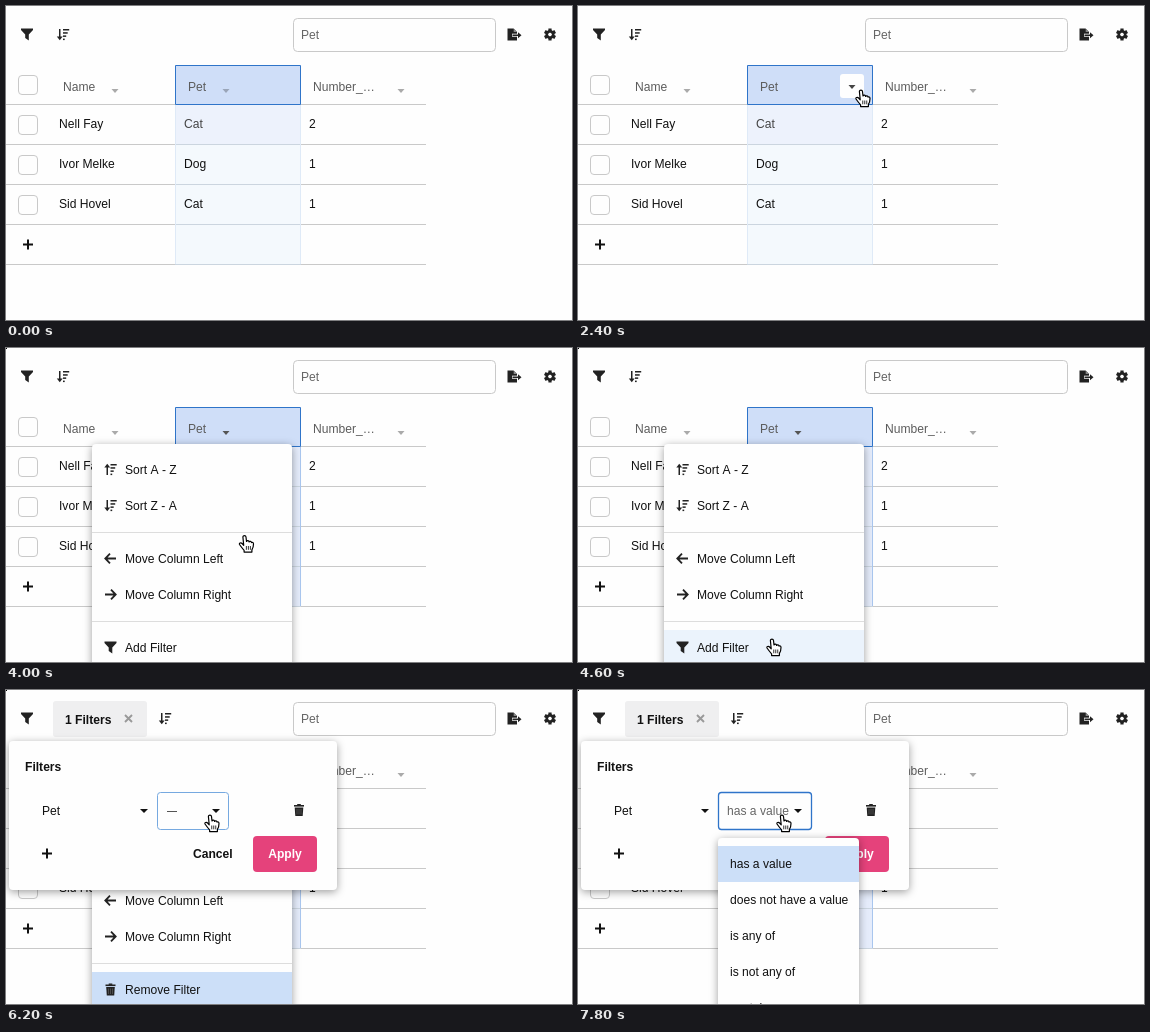
An HTML page with a canvas that plays this animation: 566x314 px, repeating every 8 s.

```html
<!DOCTYPE html>
<html lang="en">
<head>
<meta charset="utf-8">
<title>Column filter</title>
<style>
html, body { margin: 0; width: 100%; height: 100%; overflow: hidden; background: #fefefe; }
canvas { display: block; width: 566px; height: 314px; }
</style>
</head>
<body>
<canvas id="stage"></canvas>
<script>
const W = 566, H = 314, LOOP = 8000, STEP = 200;
const BLUE = '#2f74c9', INK = '#111', GREY = '#5c5c5c', LINE = '#c9c9c9', PICK = '#ccdff8';
const MENU_AT = 2800, DIALOG_AT = 5000, FOCUS_AT = 6800, LIST_AT = 7000;
const canvas = document.getElementById('stage');
const ctx = canvas.getContext('2d');
const dpr = window.devicePixelRatio || 1;
canvas.width = W * dpr;
canvas.height = H * dpr;

// Pointer tip: time, x, y
const path = [
  [1000, 352, 128], [1400, 288, 86], [1800, 283, 84], [3600, 283, 84],
  [4400, 194, 291], [5200, 194, 291], [6000, 206, 130], [6200, 204, 125], [8000, 204, 125]
];
const rows = ['Nell Fay|Cat|2', 'Ivor Melke|Dog|1', 'Sid Hovel|Cat|1'].map(r => r.split('|'));
const operators = ['has a value', 'does not have a value', 'is any of', 'is not any of', 'contains'];

function pointer(t) {
  if (t < path[0][0]) return null;
  const i = path.findIndex(k => k[0] > t);
  const [t0, x0, y0] = path[i - 1], [t1, x1, y1] = path[i];
  const u = (t - t0) / (t1 - t0), e = u * u * (3 - 2 * u);
  return { x: x0 + (x1 - x0) * e, y: y0 + (y1 - y0) * e };
}

function text(s, x, y, color = INK, weight = 400, align = 'left') {
  ctx.font = `${weight} 12.1px "Liberation Sans", Arial, sans-serif`;
  ctx.textAlign = align;
  ctx.fillStyle = color;
  ctx.fillText(s, x, y);
}

function rect(x, y, w, h, color) {
  ctx.fillStyle = color;
  ctx.fillRect(x, y, w, h);
}

function box(x, y, w, h, r, fill, stroke, width = 1) {
  ctx.beginPath();
  ctx.roundRect(x, y, w, h, r);
  if (fill) { ctx.fillStyle = fill; ctx.fill(); }
  if (stroke) { ctx.strokeStyle = stroke; ctx.lineWidth = width; ctx.stroke(); }
}

function panel(x, y, w, h) {
  ctx.save();
  ctx.shadowColor = 'rgba(0,0,0,.38)';
  ctx.shadowBlur = 9 * dpr;
  ctx.shadowOffsetY = 2 * dpr;
  box(x, y, w, h, 4, '#fefefe');
  ctx.restore();
}

function poly(points, color) {
  ctx.beginPath();
  points.forEach(([x, y]) => ctx.lineTo(x, y));
  ctx.closePath();
  ctx.fillStyle = color;
  ctx.fill();
}

function at(x, y, draw) {
  ctx.save();
  ctx.translate(x, y);
  draw();
  ctx.restore();
}

const caret = (x, y, color = INK, r = 4) =>
  poly([[x - r, y - 2], [x + r, y - 2], [x, y + 2]], color);

const plus = (x, y) => {
  rect(x - 5, y - 1, 10, 2, INK);
  rect(x - 1, y - 5, 2, 10, INK);
};

const funnel = (x, y) => at(x, y, () => poly(
  [[-6, -6], [6, -6], [6, -4.6], [1.8, 0], [1.8, 6], [-1.8, 3.6], [-1.8, 0], [-6, -4.6]], '#222'));

const sortIcon = (x, y, up) => at(x, y, () => {
  for (let i = 0; i < 4; i++) rect(0, -5.5 + i * 3.2, 6.2 - i * 1.5, 1.5, '#222');
  if (up) ctx.scale(1, -1);
  rect(-4, -5.5, 1.5, 9, '#222');
  poly([[-6.2, 2], [-0.3, 2], [-3.25, 5.8]], '#222');
});

const arrowIcon = (x, y, dir) => at(x, y, () => {
  ctx.scale(dir, 1);
  ctx.strokeStyle = '#222';
  ctx.lineWidth = 1.8;
  ctx.beginPath();
  ctx.moveTo(-5.5, 0);
  ctx.lineTo(5, 0);
  ctx.moveTo(0.5, -4.8);
  ctx.lineTo(5.2, 0);
  ctx.lineTo(0.5, 4.8);
  ctx.stroke();
});

const trash = (x, y) => at(x, y, () => {
  rect(-5, -5, 10, 1.6, '#222');
  rect(-1.8, -6, 3.6, 1.4, '#222');
  poly([[-4.3, -2.6], [4.3, -2.6], [3.7, 6], [-3.7, 6]], '#222');
  for (const dx of [-2, 0, 2]) rect(dx - 0.25, -1, 0.5, 5.5, '#777');
});

const exportIcon = (x, y) => at(x, y, () => {
  poly([[-6.5, -6], [-0.5, -6], [3, -2.5], [3, 6], [-6.5, 6]], '#222');
  poly([[-0.3, -6], [-0.3, -2.4], [3.2, -2.4]], '#888');
  rect(-2, -0.8, 5, 3, '#fefefe');
  rect(-1.5, 0, 6, 1.5, '#222');
  poly([[4, -2.3], [7.5, 0.7], [4, 3.7]], '#222');
});

const gear = (x, y) => at(x, y, () => {
  for (let i = 0; i < 6; i++) {
    rect(-1.6, -6, 3.2, 4, '#222');
    ctx.rotate(Math.PI / 3);
  }
  ctx.beginPath();
  ctx.arc(0, 0, 3.2, 0, 7);
  ctx.strokeStyle = '#222';
  ctx.lineWidth = 2.6;
  ctx.stroke();
});

function toolbar(t) {
  const filtered = t >= DIALOG_AT;
  funnel(21, 28.5);
  if (filtered) {
    box(47, 11, 94, 36, 3, '#efeff0');
    text('1 Filters', 59, 34, INK, 700);
    ctx.strokeStyle = '#999';
    ctx.lineWidth = 1.9;
    ctx.beginPath();
    for (const d of [-1, 1]) {
      ctx.moveTo(122.5 - 3.5 * d, 25);
      ctx.lineTo(122.5 + 3.5 * d, 32);
    }
    ctx.stroke();
  }
  sortIcon(filtered ? 159 : 57, 28.5);
  box(287.5, 12.5, 202, 33, 4, '#fefefe', LINE);
  text('Pet', 295, 33, '#666');
  exportIcon(508, 28.5);
  gear(544, 28.5);
}

function table(t, p) {
  const open = t >= MENU_AT;
  rect(169, 99, 126, 160, open ? '#e5ecfb' : '#f4f9fd');
  if (!open) rect(169, 99, 126, 39, '#edf2fc');
  for (let y = 98; y <= 258; y += 40) {
    rect(0, y, 420, 1, LINE);
    rect(169, y, 126, 1, '#cbd5df');
  }
  rect(169, 99, 1, 159, '#dfeaf7');
  rect(294, 99, 1, 159, open ? '#a9c6ee' : '#dfeaf7');
  box(169.5, 59.5, 125, 39, 0, '#cfdef8', BLUE);

  for (let i = 0; i < 4; i++) box(12.5, 69.5 + i * 40, 19, 19, 3.5, '#fefefe', LINE);
  text('Name', 57, 85, GREY);
  text('Pet', 182, 85, GREY);
  text('Number_…', 307, 85, GREY);
  caret(109, 85, '#aaa', 3.5);
  caret(395, 85, '#aaa', 3.5);

  const hover = p && t >= 1600 && p.y > 59 && p.y < 96;
  if (hover) {
    box(262, 68, 24, 24, 3, '#fefefe');
    caret(274, 81, '#444', 3.5);
  } else {
    caret(220, 85, open ? '#555' : '#9aa5b8', 3.5);
  }
  rows.forEach(([name, pet, count], i) => {
    const y = 122 + i * 40;
    text(name, 53, y);
    text(pet, 178, y, i || open ? INK : '#444');
    text(count, 303, y);
  });
  plus(22, 238.5);
}

function menu(t, p) {
  if (t < MENU_AT || t >= FOCUS_AT) return;
  const filtered = t >= DIALOG_AT;
  panel(86, 96, 200, 240);
  const items = [
    [104, 'Sort A - Z', (x, y) => sortIcon(x, y, true)],
    [140, 'Sort Z - A', (x, y) => sortIcon(x, y, false)],
    [193, 'Move Column Left', (x, y) => arrowIcon(x, y, -1)],
    [229, 'Move Column Right', (x, y) => arrowIcon(x, y, 1)],
    [282, filtered ? 'Remove Filter' : 'Add Filter', filtered ? trash : funnel]
  ];
  for (const [y, label, icon] of items) {
    if (filtered && y === 282) rect(86, y, 200, 36, PICK);
    else if (p.y >= y && p.y < y + 36) rect(86, y, 200, 36, '#ebf3fc');
    icon(104.5, y + 17.5);
    text(label, 119, y + 22);
  }
  rect(86, 184, 200, 1, '#ddd');
  rect(86, 273, 200, 1, '#ddd');
}

function dialog(t, p) {
  if (t < DIALOG_AT) return;
  const list = t >= LIST_AT;
  panel(3, 51, 328, 149);
  text('Filters', 19, 81, INK, 700);
  text('Pet', 36, 125);
  caret(list ? 127 : 138, 121);
  if (list) {
    box(140.5, 102.5, 93, 37, 3, null, BLUE, 1.3);
    text('has a value', 149, 125, '#666');
    caret(220, 121);
  } else {
    if (t >= FOCUS_AT) box(151.5, 102.5, 71, 37, 3, null, BLUE, 1.3);
    else if (p.y > 102 && p.y < 140) box(151.5, 102.5, 71, 37, 3, null, '#76a9e0');
    rect(161, 121, 10, 1, '#555');
    caret(210, 121);
  }
  trash(293, 120);
  plus(41, 163.5);
  text('Cancel', 187, 168, INK, 700);
  box(247, 146, 64, 36, 4, '#e5427b');
  text('Apply', 279, 168, '#fff', 700, 'center');

  if (!list) return;
  panel(140, 148, 141, 190);
  rect(140, 156, 141, 36, PICK);
  operators.forEach((label, i) => text(label, 152, 178 + i * 36));
}

function arrowCursor() {
  const shape = new Path2D('M0 0V14.5L3.4 11.4L5.8 17L8.2 16L5.8 10.6H10.5Z');
  ctx.lineWidth = 2;
  ctx.strokeStyle = '#fff';
  ctx.stroke(shape);
  ctx.fillStyle = '#000';
  ctx.fill(shape);
}

function handCursor() {
  const shape = new Path2D('M-1.6 1.5C-1.6-.4 1.4-.4 1.5 1.5L2 6C2.3 4.6 4.5 4.8 4.6 6.4' +
    'C5.2 5.3 7 5.8 7 7.1C7.8 6.4 9 7 9 8.4C9 11.8 8.4 12.8 7.4 14.3V16.6H-.4V14.8' +
    'C-2 13-3.6 11-5 9C-5.6 7.6-3.6 6.7-2.4 8L-.8 9.8Z');
  ctx.lineJoin = 'round';
  ctx.lineWidth = 1.2;
  ctx.fillStyle = '#fff';
  ctx.strokeStyle = '#000';
  ctx.fill(shape);
  ctx.stroke(shape);
  for (const x of [1.4, 3.4, 5.4]) rect(x, 10.5, 0.8, 3.8, '#000');
}

function draw(t) {
  const p = pointer(t);
  ctx.setTransform(dpr, 0, 0, dpr, 0, 0);
  rect(0, 0, W, H, '#fefefe');
  toolbar(t);
  table(t, p);
  menu(t, p);
  dialog(t, p);
  if (t >= MENU_AT) rect(0, 0, 1, 1, '#000');
  if (p) at(p.x, p.y, t < 1600 ? arrowCursor : handCursor);
}

const start = performance.now();
function tick() {
  const t = (performance.now() - start) % LOOP;
  draw(Math.floor(t / STEP) * STEP);
  requestAnimationFrame(tick);
}
tick();
</script>
</body>
</html>
```
